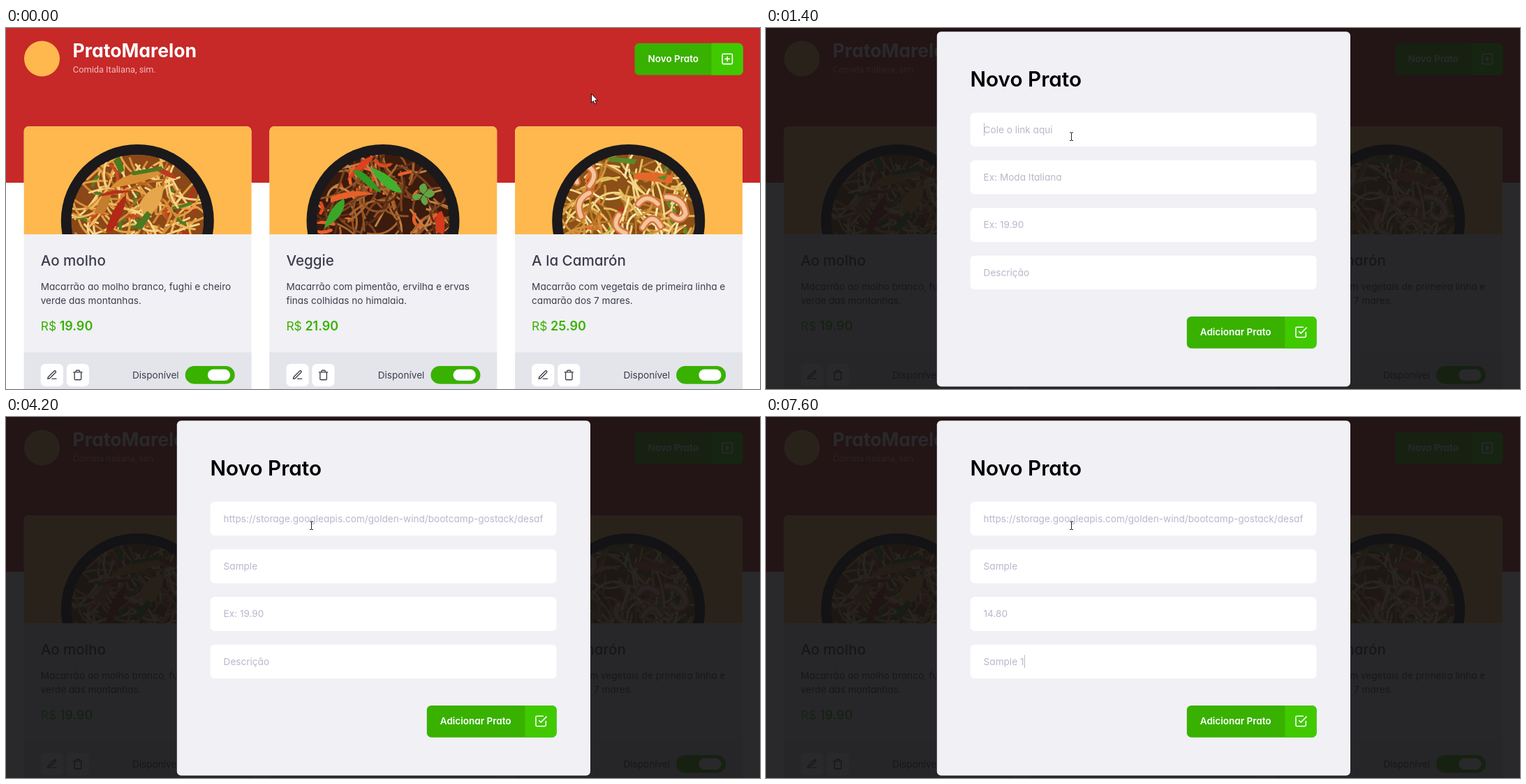
An HTML page for the animation above (8000 ms loop, 1080 px wide and 518 px high).

```html
<!DOCTYPE html>
<html lang="pt">
<head>
<meta charset="utf-8">
<title>Novo Prato</title>
<style>
  html, body { margin: 0; width: 100%; height: 100%; overflow: hidden; background: #fff; }
  svg { display: block; width: 100%; height: 100%; }
  text { font: 400 13.6px Inter, "Open Sans", sans-serif; font-feature-settings: "cv11"; fill: #3d3d4d; white-space: pre; }
  .icon { fill: none; stroke-width: 2; stroke-linecap: round; stroke-linejoin: round; }
</style>
</head>
<body>
<svg id="stage" viewBox="0 0 1080 518"></svg>
<script>
const LOOP = 8000, BLINK = 530, TICK = 67;
const GREEN = '#39b100', LIME = '#41c900', INK = '#3d3d4d';
const URL_TEXT = 'https://storage.googleapis.com/golden-wind/bootcamp-gostack/desafio-food/food3.png';
const MISSPELLED = /googleapis\.com|golden|wind|bootcamp|gostack|food3\.png/g;

const ICONS = {
  edit: 'M12 20h9M16.5 3.5a2.12 2.12 0 0 1 3 3L7 19l-4 1 1-4z',
  trash: 'M3 6h18M19 6v14a2 2 0 0 1-2 2H7a2 2 0 0 1-2-2V6m3 0V4a2 2 0 0 1 2-2h4a2 2 0 0 1 2 2v2',
  plus: 'M5 3h14a2 2 0 0 1 2 2v14a2 2 0 0 1-2 2H5a2 2 0 0 1-2-2V5a2 2 0 0 1 2-2zM12 8v8M8 12h8',
  check: 'M9 11l3 3L22 4M21 12v7a2 2 0 0 1-2 2H5a2 2 0 0 1-2-2V5a2 2 0 0 1 2-2h11'
};

// Piece paths are relative to the middle of each dish.
const DISHES = [
  {
    name: 'Ao molho', price: '19.90',
    lines: ['Macarrão ao molho branco, fughi e cheiro', 'verde das montanhas.'],
    base: '#8a4818', noodles: ['#edb85c', '#f6d488', '#d68c36', '#e3a145', '#b8661f'], bits: ['#b5301b', '#4f7d24', '#7a3d12', '#c94a1e'],
    pieces: [
      ['#d98f35', 'M-40 -46Q-22 -72 40 -73Q28 -58 -40 -46Z'],
      ['#e5a64c', 'M2 -22Q14 -48 36 -50Q40 -28 14 -3Z'],
      ['#c57c2c', 'M-62 -10Q-54 -38 -38 -46Q-36 -30 -48 -10Z'],
      ['#b32716', 'M-45 15Q-38 -18 -16 -38Q-16 -16 -36 15Z'],
      ['#b9301a', 'M-58 -34Q-40 -48 -6 -42Q-34 -38 -58 -34Z'],
      ['#bd3a1f', 'M18 -80Q48 -74 56 -60Q38 -62 18 -80Z'],
      ['#4a7a22', 'M-34 -86l8 -8l7 22l-7 4ZM-6 10l20 -24l6 5l-14 22ZM-10 -70l44 -8l4 5l-44 8Z']
    ]
  },
  {
    name: 'Veggie', price: '21.90',
    lines: ['Macarrão com pimentão, ervilha e ervas', 'finas colhidas no himalaia.'],
    base: '#3a1b0d', noodles: ['#7b4220', '#a9652d', '#8f5025', '#5c2c14', '#c08246'], bits: ['#ea6428', '#dc4a1c', '#e5602a'],
    pieces: [
      ['#e8602a', 'M-75 -34Q-42 -48 -12 -38Q-44 -36 -75 -26Z'],
      ['#df3f1e', 'M-52 -58Q-32 -92 -12 -93Q-24 -76 -52 -58Z'],
      ['#2f9a22', 'M-44 -72Q-28 -78 -2 -40Q-20 -44 -44 -72Z'],
      ['#41b02c', 'M-18 -76Q14 -68 28 -40Q2 -40 -18 -76Z'],
      ['#3aa628', 'M-84 11Q-78 -20 -56 -32Q-50 -10 -84 11Z'],
      ['#5fa544', 'M57 -38Q46 -50 59 -54Q68 -46 57 -38ZM58 -38Q70 -52 74 -38Q66 -28 58 -38ZM57 -37Q42 -42 42 -33Q48 -24 57 -37ZM58 -37Q70 -26 60 -22Q50 -28 58 -37Z'],
      ['#d43a1b', 'M76 15Q72 -10 84 -14Q92 2 86 20Z']
    ]
  },
  {
    name: 'A la Camarón', price: '25.90',
    lines: ['Macarrão com vegetais de primeira linha e', 'camarão dos 7 mares.'],
    base: '#8a5018', noodles: ['#f2d688', '#e5bc5c', '#f9e8b4', '#d0943a', '#b97726'], bits: ['#b8361a', '#5f8a28', '#e0702f', '#7a4012'],
    pieces: [
      ['#e4682a', 'M6 -68Q40 -72 64 -64L62 -54Q32 -56 8 -60Z'],
      ['#5a8a28', 'M-28 -92l40 4l-4 7l-36 -4ZM40 -62l16 -4l-4 8Z']
    ],
    shrimps: ['M-74 -55Q-82 -82 -58 -78Q-42 -68 -56 -50', 'M-68 -6Q-78 -30 -56 -40', 'M-14 -8Q-26 10 -4 18', 'M54 -34Q78 -34 82 -10Q74 4 62 -8', 'M14 -24Q26 -40 42 -24', 'M20 10Q34 -14 46 8']
  }
];

const FIELDS = ['Cole o link aqui', 'Ex: Moda Italiana', 'Ex: 19.90', 'Descrição'];
// [time, field, value after the key press]
const KEYS = [
  [1400, 0, ''], [2000, 0, URL_TEXT],
  [2270, 1, ''], [2930, 1, 'S'], [3070, 1, 'Sa'], [3130, 1, 'Sam'], [3330, 1, 'Samp'], [3400, 1, 'Sampl'], [3470, 1, 'Sample'],
  [3670, 2, ''], [4600, 2, '1'], [4730, 2, '14'], [5000, 2, '14.'], [5670, 2, '14.8'], [5800, 2, '14.80'],
  [6070, 3, ''], [6730, 3, 'S'], [6800, 3, 'Sa'], [6930, 3, 'Sam'], [7070, 3, 'Samp'], [7130, 3, 'Sampl'],
  [7270, 3, 'Sample'], [7470, 3, 'Sample '], [7600, 3, 'Sample 1']
];

const rect = (x, y, w, h, fill, r = 0) => `<rect x="${x}" y="${y}" width="${w}" height="${h}" rx="${r}" fill="${fill}"/>`;
const path = (d, fill) => `<path d="${d}" fill="${fill}"/>`;
const label = (x, y, str, style = '') => `<text x="${x}" y="${y}" style="${style}">${str}</text>`;
const icon = (name, cx, cy, scale, color) =>
  `<path class="icon" d="${ICONS[name]}" stroke="${color}" transform="translate(${cx} ${cy}) scale(${scale}) translate(-12 -12)"/>`;

function button(x, y, w, str, name) {
  const split = x + w - 45.3, h = 45.8;
  return rect(x, y, w, h, GREEN, 6.4) +
    path(`M${split} ${y}h38.9a6.4 6.4 0 0 1 6.4 6.4v${h - 12.8}a6.4 6.4 0 0 1 -6.4 6.4h-38.9z`, LIME) +
    label(x + 19, y + 27.2, str, 'font-weight:600;font-size:13.5px;fill:#fff') +
    icon(name, split + 22.8, y + 22.6, 0.8, '#fff');
}

function random(seed) {
  return () => (seed = (seed * 16807) % 2147483647) / 2147483647;
}

function noodleStrokes(dish, seed) {
  const next = random(seed);
  let out = '';
  for (let i = 0; i < 190; i++) {
    const a = next() * 6.283, r = 92 * Math.sqrt(next()), turn = next() * 6.283;
    const isBit = i % 6 === 5, len = isBit ? 12 + next() * 14 : 26 + next() * 40;
    const colors = isBit ? dish.bits : dish.noodles;
    const dx = Math.cos(turn) * len, dy = Math.sin(turn) * len, bend = (next() - 0.5) * 0.9;
    const d = [Math.cos(a) * r - dx / 2, Math.sin(a) * r - dy / 2, dx / 2 - dy * bend, dy / 2 + dx * bend, dx, dy].map(v => v.toFixed(1));
    out += `<path d="M${d[0]} ${d[1]}q${d.slice(2).join(' ')}" fill="none" stroke="${colors[Math.floor(next() * colors.length)]}" stroke-width="${isBit ? 4.5 : 3}" stroke-linecap="round"/>`;
  }
  return out;
}

function bowl(dish, i) {
  const shrimps = (dish.shrimps || []).map(d =>
    `<g fill="none" stroke-linecap="round"><path d="${d}" stroke="#d5733c" stroke-width="11"/><path d="${d}" stroke="#f3c49c" stroke-width="6"/></g>`).join('');
  return `<g clip-path="url(#photo)"><g transform="translate(162.6 276.5)">
    <circle r="109.5" fill="#1b191b"/>
    <g clip-path="url(#food)"><circle r="95" fill="${dish.base}"/>${noodleStrokes(dish, 71 + i * 907)}
    ${dish.pieces.map(([fill, d]) => path(d, fill)).join('')}${shrimps}</g></g></g>`;
}

function card(dish, i) {
  return `<g transform="translate(${25.7 + i * 351.7} 0)">
    ${path('M0 518V147.7a6.4 6.4 0 0 1 6.4 -6.4H319.4a6.4 6.4 0 0 1 6.4 6.4V518z', '#f0f0f5')}
    ${path('M0 296V147.7a6.4 6.4 0 0 1 6.4 -6.4H319.4a6.4 6.4 0 0 1 6.4 6.4V296z', '#ffb84d')}
    ${bowl(dish, i)}
    ${label(24, 341.3, dish.name, 'font-size:20.6px;font-weight:500')}
    ${dish.lines.map((line, n) => label(24, 375.6 + n * 20.4, line)).join('')}
    ${label(24, 434.2, 'R$', `font-size:17.4px;fill:${GREEN}`)}
    ${label(51, 434.2, dish.price, `font-size:18px;font-weight:600;fill:${GREEN}`)}
    ${rect(0, 465.5, 325.8, 53, '#e4e4eb')}
    ${rect(24, 482, 32.2, 32.2, '#fff', 6.4)}${icon('edit', 40.2, 498, 0.68, INK)}
    ${rect(61, 482, 32.2, 32.2, '#fff', 6.4)}${icon('trash', 77.2, 498, 0.68, INK)}
    ${label(155.3, 502.6, 'Disponível')}
    ${rect(231, 485, 71, 25.8, GREEN, 12.9)}${rect(263.2, 489.8, 32.2, 16.2, '#fff', 8.1)}
  </g>`;
}

const fieldTop = i => 121.4 + i * 68.35;

const stage = document.getElementById('stage');
stage.innerHTML = `
  <defs>
    <clipPath id="photo"><rect y="141" width="326" height="155"/></clipPath>
    <clipPath id="food"><circle r="95"/></clipPath>
    <clipPath id="inputs"><rect x="311.5" y="100" width="457.5" height="300"/></clipPath>
  </defs>
  ${rect(0, 0, 1080, 518, '#fff')}${rect(0, 0, 1080, 222, '#c72828')}
  <circle cx="51.5" cy="44" r="25.5" fill="#ffb84d"/>
  ${label(95.5, 41.6, 'PratoMarelon', 'font-size:26.6px;font-weight:700;fill:#fff')}
  ${label(95.8, 64.3, 'Comida Italiana, sim.', 'font-family:Roboto,sans-serif;font-size:12.8px;fill:#f0bcbc')}
  ${button(900.5, 21.8, 155.2, 'Novo Prato', 'plus')}
  ${DISHES.map(card).join('')}
  <g id="modal">
    ${rect(0, 0, 1080, 518, '#121214e6')}
    ${rect(244.8, 5.2, 592.2, 509.3, '#f0f0f5', 6)}
    ${label(292.5, 84.4, 'Novo Prato', 'font-size:29.7px;font-weight:600;fill:#000')}
    ${FIELDS.map((_, i) => rect(292.6, fieldTop(i), 496, 48.8, '#fff', 6.4)).join('')}
    <g clip-path="url(#inputs)">
      ${FIELDS.map((_, i) => `<text class="value" y="${fieldTop(i) + 29.1}" style="fill:#b7b7cc"></text>`).join('')}
      <path id="squiggle" fill="none" stroke="#e0302c" stroke-width="1.5" stroke-dasharray="1.5 1"/>
    </g>
    <rect id="caret" width="1" height="18.5" fill="#b7b7cc"/>
    ${button(602.8, 413.9, 185.8, 'Adicionar Prato', 'check')}
  </g>
  <path id="arrow" d="M.5 .5V13.2L3.4 10.6 5.3 15 7.5 14 5.6 9.8H9.6z" fill="#fff" stroke="#000" stroke-width=".9"/>
  <path id="beam" d="M-2.5 -5.5h2L0 -5l.5 -.5h2M0 -5V5.5M-2.5 6h2L0 5.5l.5 .5h2" fill="none" stroke="#222"/>`;

const byId = id => document.getElementById(id);
const modal = byId('modal'), squiggle = byId('squiggle'), caret = byId('caret'), arrow = byId('arrow'), beam = byId('beam');
const values = [...stage.querySelectorAll('.value')];

const show = (el, on) => el.setAttribute('visibility', on ? 'visible' : 'hidden');

// Position along a move that advances in whole screen ticks.
function progress(t, start, steps) {
  const p = Math.min(1, Math.max(0, (Math.floor((t - start) / TICK) + 1) / steps));
  return p * p * (3 - 2 * p);
}

function drawPointer(t) {
  const a = progress(t, 130, 6), b = progress(t, 930, 8);
  const x = 838 + 105 * a - 505.5 * b, y = 94 - 45 * a + 106.5 * b;
  const overInput = b > 0 && x < 788 && y > fieldTop(0);
  for (const el of [arrow, beam]) el.setAttribute('transform', `translate(${x} ${y})`);
  show(arrow, !overInput);
  show(beam, overInput);
}

function drawFields(t) {
  const contents = FIELDS.map(() => '');
  let focus = -1, since = 0;
  for (const [time, field, value] of KEYS) {
    if (time > t) break;
    focus = field;
    since = time;
    contents[field] = value;
  }
  const scrolled = focus === 0 && contents[0] !== '';
  values.forEach((el, i) => {
    const str = contents[i] || FIELDS[i];
    if (el.textContent !== str) el.textContent = str;
    const atEnd = i === 0 && scrolled;
    el.setAttribute('x', atEnd ? 768.3 : 311.6);
    el.setAttribute('text-anchor', atEnd ? 'end' : 'start');
  });

  show(caret, focus >= 0 && Math.floor((t - since) / BLINK) % 2 === 0);
  if (focus >= 0) {
    const width = contents[focus] ? values[focus].getComputedTextLength() : 0;
    caret.setAttribute('x', scrolled ? 768 : Math.round(312 + width));
    caret.setAttribute('y', fieldTop(focus) + 15);
  }

  const checked = scrolled && t >= 2070;
  show(squiggle, checked);
  if (checked) {
    const at = n => values[0].getStartPositionOfChar(n).x;
    squiggle.setAttribute('d', [...URL_TEXT.matchAll(MISSPELLED)].map(m => {
      const end = values[0].getEndPositionOfChar(m.index + m[0].length - 1).x;
      return `M${at(m.index)} 152.5H${end}`;
    }).join(''));
  }
}

function draw(t) {
  const open = t >= 800;
  modal.setAttribute('display', open ? 'inline' : 'none');
  if (open) {
    drawFields(t);
  } else {
    show(caret, false);
    show(squiggle, false);
  }
  drawPointer(t);
}

const startTime = performance.now();
function frame() {
  draw((performance.now() - startTime) % LOOP);
  requestAnimationFrame(frame);
}
frame();
</script>
</body>
</html>
```
